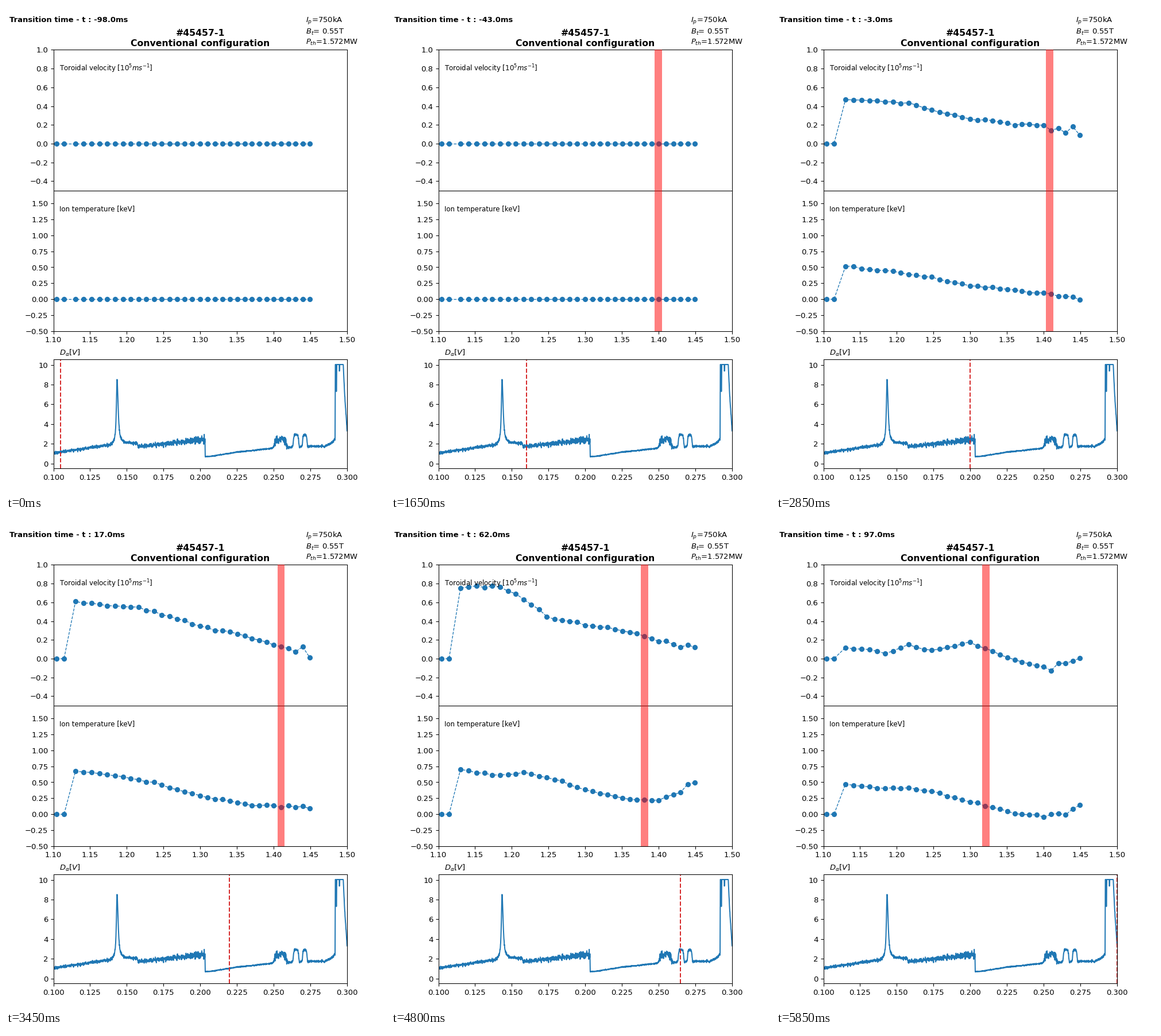
Animation, 660 px wide and 849 px high, one loop 6000 ms. Source, as a matplotlib script:

```python
import numpy as np
import matplotlib.pyplot as plt
from matplotlib.animation import FuncAnimation

W, H = 660, 849
DPI = W / 7
FRAMES, INTERVAL = 40, 150
DATA_START = 12      # first step with measured profiles
BURST_STEP = 36      # edge outliers peak here
BAND_WIDTH = 0.01

plt.rcParams["font.family"] = "DejaVu Sans"

# Channel radii: two inner ones, then 32 that slowly draw together
s = np.linspace(0, 1, 32)
R = np.concatenate([[1.1043, 1.1145], 1.1301 + 0.3191 * s + 0.0188 * s * (1 - s)])

# Profile levels at a few radii (columns) and steps (rows)
KNOT_R = [1.13, 1.184, 1.216, 1.248, 1.299, 1.36, 1.40, 1.449]
KNOT_STEPS = [16, 23, 28, 36, 39]
VELOCITY = np.array([
    [0.38, 0.36, 0.35, 0.28, 0.21, 0.19, 0.22, 0.16],
    [0.60, 0.56, 0.55, 0.47, 0.35, 0.24, 0.14, 0.08],
    [0.77, 0.80, 0.78, 0.55, 0.39, 0.30, 0.23, 0.10],
    [0.76, 0.74, 0.51, 0.35, 0.34, 0.27, 0.16, 0.12],
    [0.12, 0.07, 0.14, 0.08, 0.17, -0.01, -0.10, 0.00]])
TEMPERATURE = np.array([
    [0.38, 0.33, 0.29, 0.25, 0.15, 0.13, 0.06, -0.07],
    [0.68, 0.60, 0.54, 0.46, 0.29, 0.17, 0.11, 0.14],
    [0.78, 0.68, 0.64, 0.60, 0.35, 0.21, 0.15, 0.35],
    [0.63, 0.52, 0.67, 0.56, 0.41, 0.26, 0.27, 0.55],
    [0.46, 0.41, 0.41, 0.34, 0.20, 0.01, -0.03, 0.10]])
BURST_SHAPE = np.array([0.25, 1, -0.3])   # on the three outermost channels

BAND_STEPS = [1, 6, 16, 23, 28, 36, 39]
BAND_CENTRES = [1.4035, 1.3931, 1.4063, 1.4101, 1.3915, 1.3694, 1.3215]


def profile(step, levels, burst, seed):
    """Blend levels in time and radius, then add scatter and the burst."""
    if step < DATA_START:
        return np.zeros(len(R))
    knots = [np.interp(step, KNOT_STEPS, column) for column in levels.T]
    rng = np.random.default_rng(100 * seed + step)
    scatter = 0.007 + 0.025 * np.clip((R - 1.38) / 0.07, 0, 1)
    y = np.interp(R, KNOT_R, knots) + scatter * rng.normal(size=len(R))
    y[-3:] += burst * BURST_SHAPE * max(0, 1 - abs(step - BURST_STEP) / 2)
    y[:2] = 0
    return y


def d_alpha():
    """Emission trace: base level, spike, humps and noise, then saturation."""
    t = np.linspace(0, 200, 2001)   # ms after 0.1 s
    y = np.interp(
        t,
        [0, 38, 48, 57, 57.5, 103.2, 103.4, 107, 125, 150, 176, 185, 190,
         191.8, 192, 197.2, 198.4, 200],
        [1.05, 1.85, 2.0, 2.05, 1.7, 2.45, 0.7, 0.72, 1.15, 1.55, 1.75, 1.75,
         2.15, 2.5, 10.5, 10.5, 6.8, 3.35])
    y += 6.6 / (1 + ((t - 43.4) / np.where(t < 43.4, 0.6, 0.85)) ** 2)
    for centre, width, height in [(154.4, 4.1, 0.85), (165.2, 1.9, 1.25),
                                  (171.2, 1.6, 1.15), (192.7, 0.2, -3.1),
                                  (194.8, 0.15, -1.2)]:
        y += height * np.exp(-((t - centre) / width) ** 6)
    noise = np.interp(
        t, [0, 57, 100, 103.2, 103.4, 150, 150.5, 158, 160, 200],
        [0.07, 0.08, 0.17, 0.2, 0.015, 0.04, 0.22, 0.22, 0.07, 0.06])
    y += noise * np.random.default_rng(4).normal(size=t.size)
    return 0.1 + t / 1000, np.minimum(y, 10.03)


# The tiny excess keeps the height from being truncated to one pixel less
fig = plt.figure(figsize=(W / DPI, H / DPI + 1e-9), dpi=DPI, facecolor="white")


def panel(top, bottom, xlim, ylim):
    ax = fig.add_axes([0.125, 1 - bottom / H, 0.775, (bottom - top) / H])
    ax.set(xlim=xlim, ylim=ylim)
    return ax


def label(x, y, text, **style):
    """Text with its baseline start at stage pixel x, y."""
    return fig.text(x / W, 1 - y / H, text, **style)


ax_vel = panel(76.4, 321.7, (1.1, 1.5), (-0.5, 1.0))
ax_ti = panel(321.7, 567, (1.1, 1.5), (-0.5, 1.7))
ax_da = panel(616.4, 806.5, (0.1, 0.3), (-0.52, 10.53))

ax_vel.set_xticks([])
ax_vel.set_yticks(np.arange(-2, 6) * 0.2)
ax_ti.set_xticks(np.arange(9) * 0.05 + 1.1)
ax_ti.set_yticks(np.arange(-2, 7) * 0.25)
ax_da.set_xticks(np.arange(9) * 0.025 + 0.1)
ax_da.set_yticks(range(0, 11, 2))

ax_vel.set_title("#45457-1\nConventional configuration", weight="bold", pad=5)
ax_vel.text(0.02, 0.85, "Toroidal velocity [$10^5 ms^{-1}$]", fontsize=9,
            transform=ax_vel.transAxes)
ax_ti.text(0.02, 0.85, "Ion temperature [keV]", fontsize=9,
           transform=ax_ti.transAxes)
label(92.7, 608.8, r"$D_\alpha [V]$")
label(522.5, 29, "$I_p$=750kA")
label(522.5, 49, "$B_t$= 0.55T")
label(522.5, 67, "$P_{th}$=1.572MW")
clock = label(6, 28, "", weight="bold")

dots = dict(color="C0", linestyle="--", marker="o", linewidth=1)
vel_line, = ax_vel.plot(R, 0 * R, **dots)
ti_line, = ax_ti.plot(R, 0 * R, **dots)
bands = [ax.axvspan(1.3, 1.3 + BAND_WIDTH, color="red", alpha=0.5,
                    linewidth=0, zorder=3) for ax in (ax_vel, ax_ti)]
ax_da.plot(*d_alpha(), color="C0", linewidth=1.5)
cursor = ax_da.axvline(0.105, color="C3", linestyle="--", linewidth=1.5)


def update(step):
    clock.set_text(f"Transition time - t : {-98 + 5 * step:.1f}ms")
    cursor.set_xdata([0.105 + 0.005 * step] * 2)
    vel_line.set_ydata(profile(step, VELOCITY, -1.15, 1))
    ti_line.set_ydata(profile(step, TEMPERATURE, 2.4, 2))
    centre = np.interp(step, BAND_STEPS, BAND_CENTRES)
    for band in bands:
        band.set_visible(step >= BAND_STEPS[0])
        band.set_x(centre - BAND_WIDTH / 2)
    return [clock, cursor, vel_line, ti_line, *bands]


anim = FuncAnimation(fig, update, frames=FRAMES, init_func=lambda: update(0),
                     interval=INTERVAL, repeat=True, repeat_delay=0)
plt.show()
```
